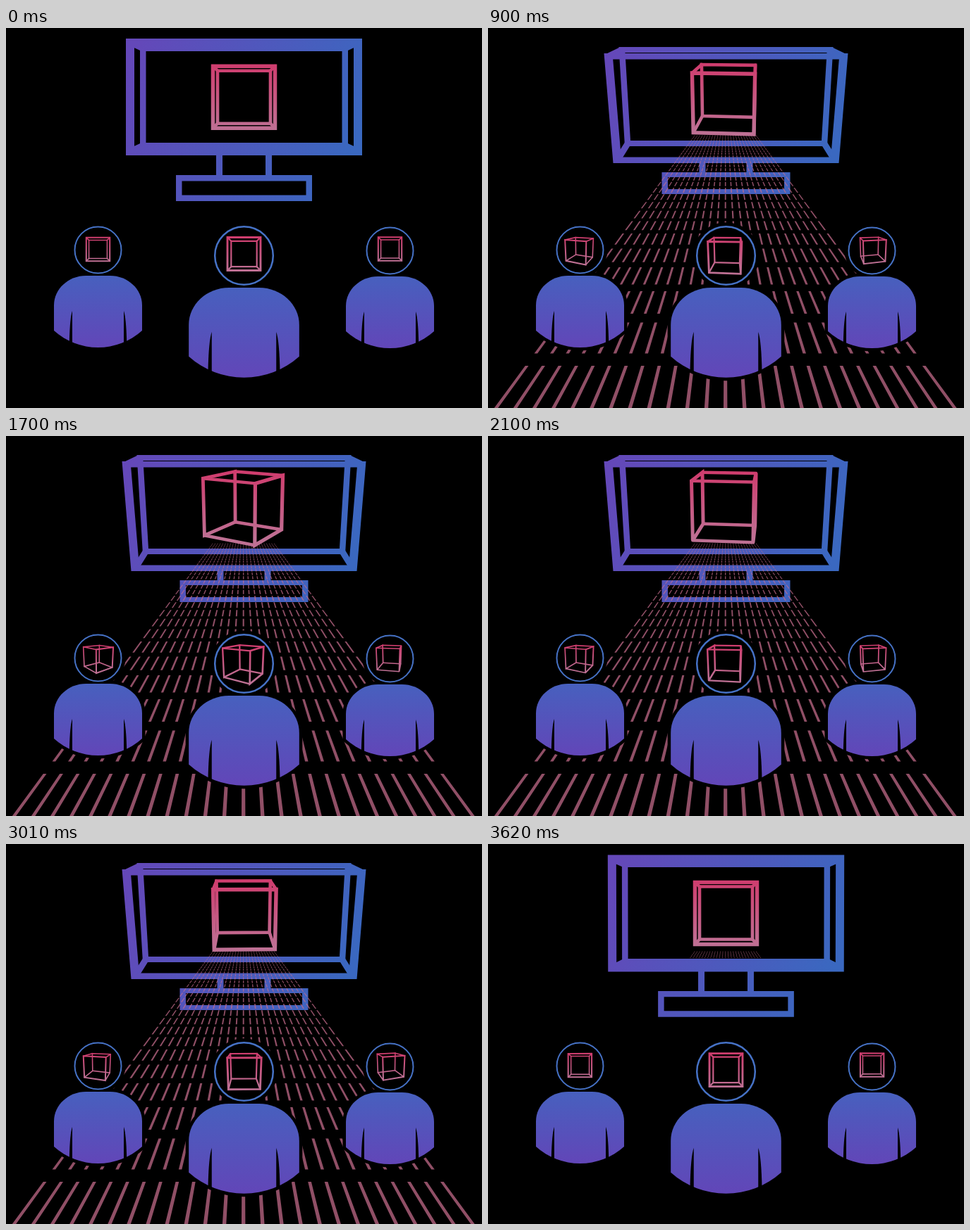
An HTML page with a canvas for the animation above (3.64 s loop, 675x540 px).

```html
<!DOCTYPE html>
<html lang="en">
<head>
<meta charset="utf-8">
<title>Shared view</title>
<style>
  html, body { margin: 0; width: 100%; height: 100%; overflow: hidden; background: #000; }
  canvas { display: block; width: 675px; height: 540px; }
</style>
</head>
<body>
<canvas id="stage" width="675" height="540"></canvas>
<script>
const ctx = document.getElementById('stage').getContext('2d');
const LOOP = 3640;
const CX = 337.5;

const clamp = u => Math.min(1, Math.max(0, u));
const easeInOut = (u, power) => {
  u = clamp(u);
  return u < 0.5 ? Math.pow(2 * u, power) / 2 : 1 - Math.pow(2 - 2 * u, power) / 2;
};
// Smooth curve through start, middle and end values.
const through = (a, m, b, p) =>
  a * (1 - p) * (1 - 2 * p) + 4 * m * p * (1 - p) + b * p * (2 * p - 1);

function gradient(x0, y0, x1, y1, from, to) {
  const g = ctx.createLinearGradient(x0, y0, x1, y1);
  g.addColorStop(0, from);
  g.addColorStop(1, to);
  return g;
}

function polygon(points) {
  points.forEach(([x, y], i) => i ? ctx.lineTo(x, y) : ctx.moveTo(x, y));
  ctx.closePath();
}

// Symmetric frame: half widths and heights of its top and bottom edge, bar sizes.
function drawFrame({ topW, topY, bottomW, bottomY, bx, by }) {
  const ring = (dx, dy) => {
    const slope = (bottomW - topW) / (bottomY - topY);
    const a = topW - dx + slope * dy, b = bottomW - dx - slope * dy;
    polygon([[CX - a, topY + dy], [CX + a, topY + dy], [CX + b, bottomY - dy], [CX - b, bottomY - dy]]);
  };
  ctx.beginPath();
  ring(0, 0);
  ring(bx, by);
  ctx.fill('evenodd');
}

function drawMonitor(p) {
  const front = {
    topW: through(167.5, 171, 173, p), topY: through(15, 26, 36, p),
    bottomW: through(167.5, 163, 160, p), bottomY: through(181, 188.5, 192, p),
    bx: 12, by: 11 - 2.5 * p
  };
  const back = {
    topW: through(147.5, 150, 152, p), topY: through(25, 26, 27, p),
    bottomW: through(147.5, 145, 143.5, p), bottomY: through(171, 170, 168, p),
    bx: 8.5, by: 8
  };
  const base = {
    topW: 96.5 - 5.5 * p, topY: 209 - 4 * p,
    bottomW: 96.5 - 5.5 * p, bottomY: 246 - 10 * p,
    bx: 8.5, by: 8.5 - 1.5 * p
  };
  ctx.fillStyle = ctx.strokeStyle = gradient(180, 30, 500, 150, '#6448b9', '#3a68c0');
  [front, back, base].forEach(drawFrame);

  ctx.lineWidth = 9;
  ctx.lineCap = 'butt';
  ctx.beginPath();
  const corners = f => [
    [f.topW - f.bx / 2, f.topY + f.by / 2],
    [f.bottomW - f.bx / 2, f.bottomY - f.by / 2]
  ];
  const near = corners(front), far = corners(back);
  for (const side of [-1, 1]) {
    near.forEach(([x, y], i) => {
      ctx.moveTo(CX + side * x, y);
      ctx.lineTo(CX + side * far[i][0], far[i][1]);
    });
    const neckX = CX + side * (35 - 1.5 * p);
    ctx.moveTo(neckX, front.bottomY - 1);
    ctx.lineTo(neckX, base.topY + 1);
  }
  ctx.stroke();
}

function drawFloor(p) {
  if (p <= 0) return;
  const horizon = 93, depth = 0.000488, nearest = 0.002584;
  const xAt = (column, y) => 336.7 + column * 27.1 * (y - horizon) / 447;
  ctx.save();
  ctx.beginPath();
  ctx.rect(0, 152, 675, 412 * p);
  ctx.clip();
  ctx.fillStyle = 'rgba(200,110,142,0.72)';
  ctx.beginPath();
  for (let row = 0; row < 30; row++) {
    const w = nearest + depth * row;
    const y0 = horizon + 1 / w, y1 = horizon + 1 / (w - depth * 0.75);
    for (let c = -12; c <= 12; c++) {
      polygon([[xAt(c - 0.1, y0), y0], [xAt(c + 0.1, y0), y0],
               [xAt(c + 0.1, y1), y1], [xAt(c - 0.1, y1), y1]]);
    }
  }
  ctx.fill();
  ctx.restore();
}

function drawCube({ x, y, half, distance, line, tilt, yaw }) {
  const rad = Math.PI / 180;
  const sy = Math.sin(yaw * rad), cy = Math.cos(yaw * rad);
  const st = Math.sin(tilt * rad), ct = Math.cos(tilt * rad);
  const project = (px, py, pz) => {
    const rx = px * cy - pz * sy, rz = px * sy + pz * cy;
    const scale = distance / (distance - half * (rz * ct - py * st));
    return [x + half * rx * scale, y + half * (py * ct + rz * st) * scale];
  };
  const face = z => [[-1, -1], [1, -1], [1, 1], [-1, 1]].map(([a, b]) => project(a, b, z));
  const faces = [face(-1), face(1)];

  ctx.strokeStyle = gradient(0, y - half * 1.15, 0, y + half * 1.15, '#cf3d6e', '#bf7094');
  ctx.lineJoin = 'miter';
  ctx.miterLimit = 2.5;
  ctx.lineCap = 'round';
  faces.forEach((points, i) => {
    const z = (i ? 1 : -1) * half * cy * ct;
    ctx.lineWidth = line * distance / (distance - z);
    ctx.beginPath();
    polygon(points);
    ctx.stroke();
  });
  ctx.lineWidth = line * 0.9;
  ctx.beginPath();
  faces[0].forEach((point, i) => {
    ctx.moveTo(...point);
    ctx.lineTo(...faces[1][i]);
  });
  ctx.stroke();
}

function bodyPath() {
  const radius = 93.4, spread = Math.asin(62.5 / radius);
  ctx.beginPath();
  ctx.moveTo(-17, 0);
  ctx.lineTo(17, 0);
  ctx.bezierCurveTo(42, 0, 62.5, 19, 62.5, 42);
  ctx.lineTo(62.5, 78);
  ctx.arc(0, 102 - radius, radius, Math.PI / 2 - spread, Math.PI / 2 + spread);
  ctx.lineTo(-62.5, 42);
  ctx.bezierCurveTo(-62.5, 19, -42, 0, -17, 0);
  ctx.closePath();
}

function drawPerson({ x, headY, headR, line, bodyY, scale, cubeY, turn }, p, spin) {
  ctx.fillStyle = ctx.strokeStyle = '#000';
  ctx.beginPath();
  ctx.arc(x, headY, headR + 6, 0, 7);
  ctx.fill();

  ctx.save();
  ctx.translate(x, bodyY);
  ctx.scale(scale, scale);
  bodyPath();
  ctx.lineJoin = 'round';
  ctx.lineWidth = 9 / scale;
  ctx.stroke();
  ctx.fillStyle = gradient(0, 0, 0, 102, '#4760be', '#6246b8');
  ctx.fill();
  ctx.fillStyle = '#000';
  for (const side of [-1, 1]) {
    ctx.beginPath();
    ctx.moveTo(side * 36.5, 50);
    ctx.quadraticCurveTo(side * 40, 60, side * 40.7, 95);
    ctx.lineTo(side * 36.5, 97);
    ctx.closePath();
    ctx.fill();
  }
  ctx.restore();

  ctx.strokeStyle = '#4672c6';
  ctx.lineWidth = line;
  ctx.beginPath();
  ctx.arc(x, headY, headR, 0, 7);
  ctx.stroke();

  const size = headR / 41.3;
  const fit = scale > 1 ? 1 : size * 0.89;
  drawCube({
    x, y: cubeY, half: 20.5 * fit, distance: 162 * fit, line: 2.5 * fit,
    tilt: 15 * p, yaw: spin + turn * p
  });
}

const people = [
  { x: 130.5, headY: 315.5, headR: 33, line: 2, bodyY: 352, scale: 1, cubeY: 314.5, turn: 20 },
  { x: 544.5, headY: 316.5, headR: 33, line: 2, bodyY: 353, scale: 1, cubeY: 314, turn: -20 },
  { x: 337.5, headY: 323.5, headR: 41.3, line: 2.5, bodyY: 369, scale: 1.253, cubeY: 321, turn: 0 }
];

function draw(time) {
  // The picture advances in 50 ms steps with one slightly longer hold.
  const t = Math.floor((time - (time >= 2800 ? 10 : 0)) / 50) * 50;
  const p = easeInOut((t - 98) / 500, 2) - easeInOut((t - 3155) / 500, 2);
  const spin = 360 * easeInOut((t - 10) / 3660, 5);

  ctx.fillStyle = '#000';
  ctx.fillRect(0, 0, 675, 540);
  drawMonitor(p);
  drawFloor(p);
  drawCube({ x: CX, y: 98.2, half: 40.5, distance: 506, line: 5, tilt: 13 * p, yaw: spin });
  people.forEach(person => drawPerson(person, p, spin));
}

const start = performance.now();
function tick() {
  draw((performance.now() - start) % LOOP);
  requestAnimationFrame(tick);
}
tick();
</script>
</body>
</html>
```
